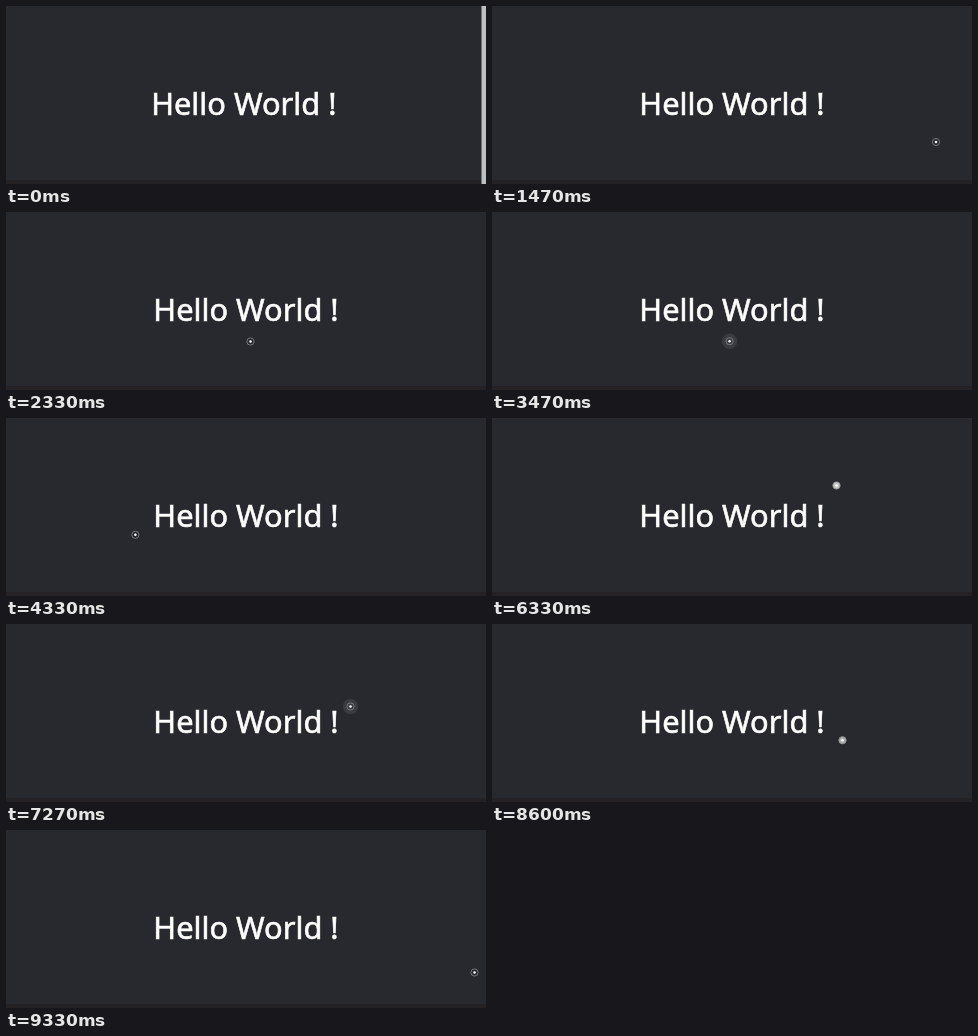
Write an HTML page that moves like this. It is 480 by 178 pixels and loops after 9990 ms.

```html
<!DOCTYPE html>
<html lang="en">
<head>
<meta charset="utf-8">
<title>Hello World</title>
<style>
  html, body { margin: 0; width: 100%; height: 100%; overflow: hidden; background: #28292e; }
  svg { display: block; width: 480px; height: 178px; }
  text {
    font: 500 30.8px "Noto Sans", sans-serif;
    fill: #fff; stroke: #fff; stroke-width: .65; text-anchor: middle;
  }
</style>
</head>
<body>
<svg viewBox="0 0 480 178">
  <rect width="480" height="178" fill="#28292e"/>
  <rect y="174" width="480" height="4" fill="#252226"/>
  <text id="title" y="109">Hello World !</text>
  <rect id="scrollbar" x="475.5" width="4.5" height="178" fill="#bfc0c3"/>
  <g id="cursor">
    <circle id="halo" r="7.7" fill="#fff"/>
    <circle id="disc" r="3.8" fill="#c4c4c6"/>
    <circle r="3.6" fill="none" stroke="#87888b" stroke-width=".8"/>
    <circle r="1.25" fill="#fff"/>
  </g>
</svg>
<script>
const LOOP = 9990, STEP = 1000 / 15, ENTER = 1470;
const [title, scrollbar, cursor, halo, disc] =
  ["title", "scrollbar", "cursor", "halo", "disc"].map(id => document.getElementById(id));

// Each gesture follows a Bézier curve; the pointer rests in between
const gestures = [
  { from: 1470, to: 2330, curve: [[444, 136], [340, 142], [244.5, 129.5]] },
  { from: 3430, to: 3730, curve: [[244.5, 129], [193, 130.5]] },
  { from: 3930, to: 5000, curve: [[193, 130.5], [110, 138], [95, 78], [166, 69]] },
  { from: 5000, to: 5930, curve: [[166, 69], [255, 178], [344.5, 67.5]] },
  { from: 6400, to: 6670, curve: [[344.5, 67.5], [344.5, 82.5]] },
  { from: 7800, to: 8070, curve: [[344.5, 82.5], [350.5, 116.3]] },
  { from: 8600, to: 9330, curve: [[350.5, 116.3], [36, 76], [288, 85], [468.5, 142.5]] }
];

const clamp = v => Math.min(1, Math.max(0, v));

function bezier(points, k) {
  if (points.length === 1) return points[0];
  const [ax, ay] = bezier(points.slice(0, -1), k);
  const [bx, by] = bezier(points.slice(1), k);
  return [ax + (bx - ax) * k, ay + (by - ay) * k];
}

function position(t) {
  const { from, to, curve } = gestures.findLast(g => g.from <= t) || gestures[0];
  return bezier(curve, clamp((t - from) / (to - from)));
}

// Fades in after `from` and out again before `to`
const pulse = (t, from, to) => clamp(Math.min(t - from, to - t) / 200);

function draw(now) {
  // The pointer is redrawn fifteen times a second
  const t = Math.round(Math.floor((now % LOOP + 5) / STEP) * STEP / 10) * 10;
  const entered = t >= ENTER;
  title.setAttribute("x", entered ? 240 : 237.8);
  scrollbar.style.display = entered ? "none" : "";
  cursor.style.display = entered ? "" : "none";
  cursor.setAttribute("transform", `translate(${position(t)})`);
  halo.setAttribute("opacity", 0.085 * (pulse(t, 2670, 3670) + pulse(t, 6400, 7670)));
  disc.setAttribute("opacity", pulse(t, 6130, 6530) + pulse(t, 8270, 8770));
}

const start = performance.now();
function tick() {
  draw(performance.now() - start);
  requestAnimationFrame(tick);
}
tick();
</script>
</body>
</html>
```
